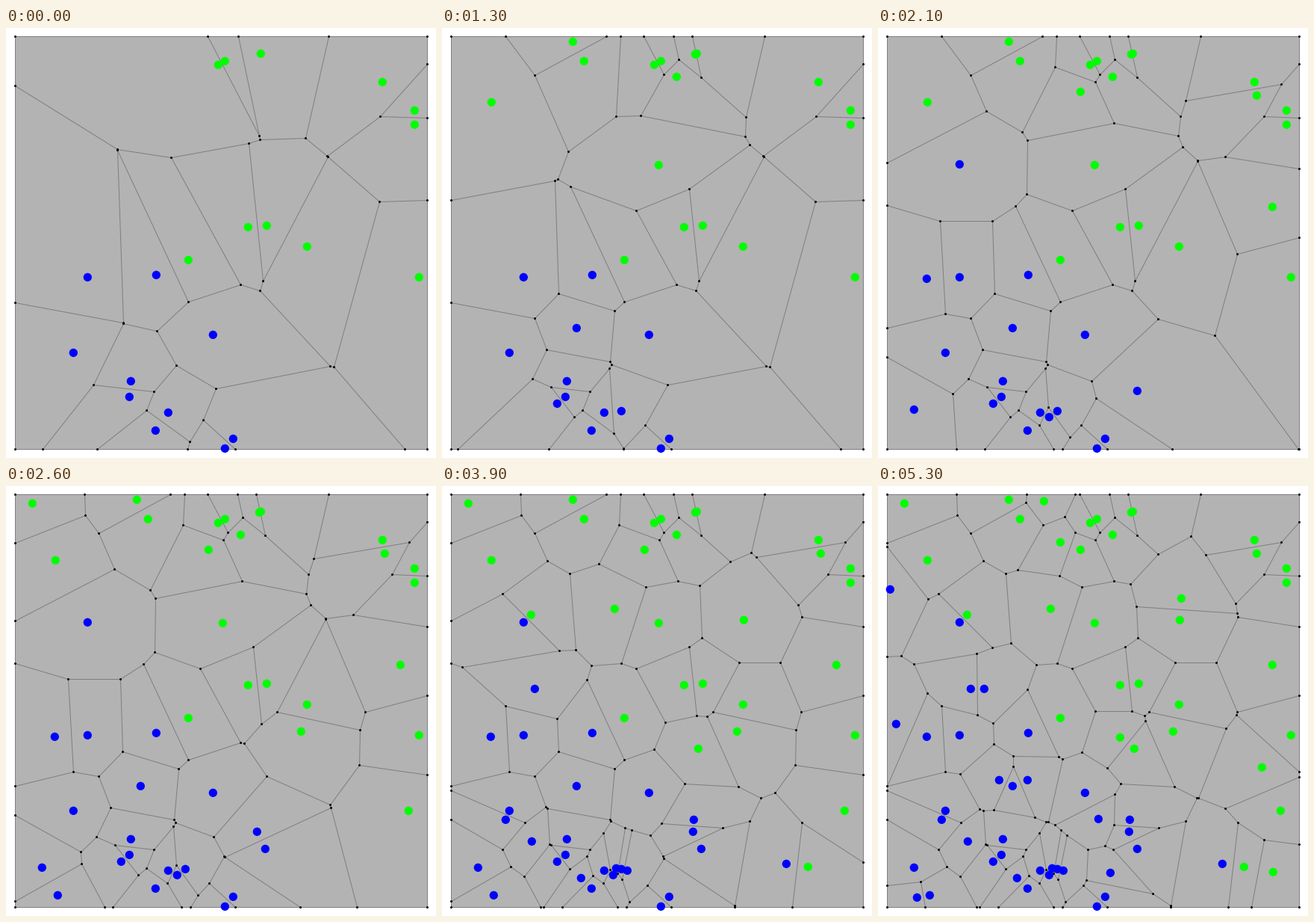
Recreate the animation shown at these times as a matplotlib script. Size 576 by 575 pixels, loop 8 s.

```python
import numpy as np
import matplotlib.pyplot as plt
from matplotlib.animation import FuncAnimation
from matplotlib.collections import LineCollection
from matplotlib.patches import Rectangle

W, H, DPI = 576, 575, 64
PX = 72 / DPI  # points per pixel
LEFT, TOP, RIGHT, BOTTOM = 12, 11, 564, 563
STEP_MS, FRAMES, FIRST_STEP = 100, 80, 5
BLUE, GREEN = "#0000ff", "#00ff00"
SITE_SIZE, CORNER_SIZE = (11.3 * PX) ** 2, (3 * PX) ** 2

START_BLUE = [
    (109.4, 333.4), (201.5, 330.4), (277.6, 410.8), (90.4, 434.3),
    (167.6, 472.5), (165.3, 493.4), (217.5, 514.6), (200.5, 538.1),
    (304.7, 549.4), (293.4, 562.0),
]
START_GREEN = [
    (284.7, 49.2), (293.9, 44.5), (341.4, 34.7), (504.2, 72.0),
    (547.6, 110.4), (547.0, 129.4), (324.5, 266.7), (349.5, 264.1),
    (403.5, 292.5), (244.4, 310.4), (553.4, 333.4),
]
# Sites in the order they are inserted
ADDED = [
    (66.4, 99.6, GREEN), (180.4, 401.5, BLUE), (314.5, 65.5, GREEN),
    (154.3, 502.1, BLUE), (240.1, 512.9, BLUE), (190.2, 44.6, GREEN),
    (339.9, 35.0, GREEN), (175.7, 18.0, GREEN), (290.5, 183.5, GREEN),
    (271.4, 85.4, GREEN), (109.4, 182.6, BLUE), (507.3, 90.0, GREEN),
    (347.2, 485.4, BLUE), (65.4, 335.9, BLUE), (528.5, 239.5, GREEN),
    (48.5, 510.3, BLUE), (229.5, 520.6, BLUE), (336.5, 462.4, BLUE),
    (35.6, 23.0, GREEN), (395.9, 328.6, GREEN), (539.5, 434.5, GREEN),
    (69.4, 547.5, BLUE), (490.5, 509.0, GREEN), (85.3, 446.1, BLUE),
    (119.5, 172.5, GREEN), (404.4, 179.8, GREEN), (186.6, 524.3, BLUE),
    (231.5, 164.5, GREEN), (461.6, 505.8, BLUE), (124.4, 271.6, BLUE),
    (337.7, 446.9, BLUE), (343.4, 351.9, GREEN), (120.5, 475.5, BLUE),
    (233.4, 511.8, BLUE), (248.2, 514.5, BLUE), (142.3, 271.3, BLUE),
    (244.4, 75.6, GREEN), (162.4, 393.4, BLUE), (514.5, 376.5, GREEN),
    (324.4, 336.6, GREEN), (52.5, 550.9, BLUE), (222.3, 20.3, GREEN),
    (529.2, 516.3, GREEN), (311.2, 517.3, BLUE), (200.3, 393.0, BLUE),
    (406.3, 150.7, GREEN), (16.5, 138.7, BLUE), (295.5, 445.6, BLUE),
    (24.4, 318.0, BLUE),
]

SITES = START_BLUE + START_GREEN + [(x, y) for x, y, _ in ADDED]
COLORS = ([BLUE] * len(START_BLUE) + [GREEN] * len(START_GREEN)
          + [c for _, _, c in ADDED])
N_START = len(START_BLUE) + len(START_GREEN)


def clip(poly, p, q):
    """Keep the part of poly that is closer to p than to q."""
    a, b = q[0] - p[0], q[1] - p[1]
    c = a * (p[0] + q[0]) / 2 + b * (p[1] + q[1]) / 2
    side = [a * x + b * y - c for x, y in poly]
    if max(side) <= 0:
        return poly
    out = []
    for i, (x1, y1) in enumerate(poly):
        s0, s1 = side[i - 1], side[i]
        if (s0 > 0) != (s1 > 0):
            x0, y0 = poly[i - 1]
            t = s0 / (s0 - s1)
            out.append((x0 + t * (x1 - x0), y0 + t * (y1 - y0)))
        if s1 <= 0:
            out.append((x1, y1))
    return out


def snap(v):
    """Truncate to a whole pixel and return that pixel's centre."""
    return tuple(int(c + 1e-6) + 0.5 for c in v)


def voronoi(sites):
    """Unique edges and corners of the bounded diagram, on whole pixels."""
    edges, corners = set(), set()
    for p in sites:
        cell = [(LEFT, TOP), (RIGHT, TOP), (RIGHT, BOTTOM), (LEFT, BOTTOM)]
        for q in sites:
            if q is not p:
                cell = clip(cell, p, q)
        pts = [snap(v) for v in cell]
        corners.update(pts)
        for i, v in enumerate(pts):
            if v != pts[i - 1]:
                edges.add(tuple(sorted((pts[i - 1], v))))
    return sorted(edges), sorted(corners)


DIAGRAMS = [voronoi(SITES[:N_START + k]) for k in range(len(ADDED) + 1)]
SITE_DOTS = np.floor(SITES) + 0.3

fig = plt.figure(figsize=(W / DPI, H / DPI), dpi=DPI, facecolor="white")
ax = fig.add_axes([0, 0, 1, 1])
ax.set_xlim(0, W)
ax.set_ylim(H, 0)
ax.axis("off")

ax.add_patch(Rectangle((LEFT + 0.5, TOP + 0.5), RIGHT - LEFT, BOTTOM - TOP,
                       facecolor="#b3b3b3", edgecolor="none", zorder=1))
lines = LineCollection([], colors="#7f7f7f", linewidths=PX, zorder=2)
lines.set_snap(False)
ax.add_collection(lines)
# Corners and sites share one collection, as mixed sizes keep exact positions
dots = ax.scatter([], [], linewidths=0, zorder=3)
dots.set_snap(False)


def update(frame):
    k = min(max(frame - FIRST_STEP + 1, 0), len(ADDED))
    n = N_START + k
    edges, corners = DIAGRAMS[k]
    lines.set_segments(edges)
    dots.set_offsets(np.vstack([corners, SITE_DOTS[:n]]))
    dots.set_sizes([CORNER_SIZE] * len(corners) + [SITE_SIZE] * n, DPI)
    dots.set_facecolors(["black"] * len(corners) + COLORS[:n])
    return lines, dots


anim = FuncAnimation(fig, update, frames=FRAMES, interval=STEP_MS,
                     repeat=True, repeat_delay=0)
plt.show()
```
